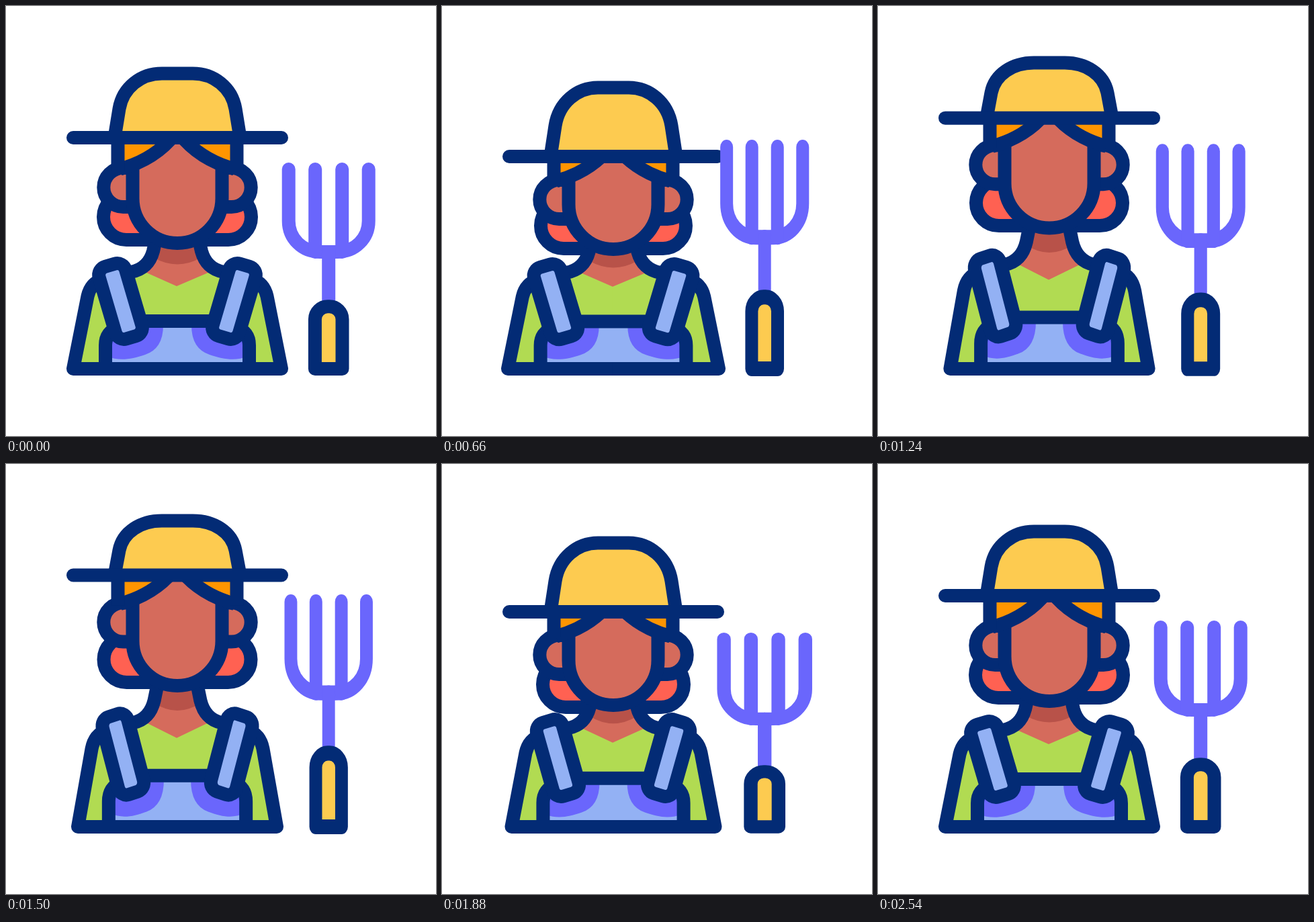
Recreate the animation shown at these times as an HTML page with a canvas. Size 640 by 640 pixels, loop 2880 ms.

```html
<!DOCTYPE html>
<html lang="en">
<head>
<meta charset="utf-8">
<title>Gardener</title>
<style>
html, body { margin: 0; width: 100%; height: 100%; overflow: hidden; background: #fff; }
canvas { display: block; width: 640px; height: 640px; }
</style>
</head>
<body>
<canvas id="stage" width="640" height="640"></canvas>
<script>
const ctx = document.getElementById('stage').getContext('2d');
const LOOP = 2880, STEP = 20, MID = 255, GROUND = 540;
const NAVY = '#032b75', YELLOW = '#fdcb50', ORANGE = '#ff9500', SKIN = '#d56b5c',
  SHADE = '#b85249', RED = '#ff6152', GREEN = '#b1db52', BLUE = '#93b1f4', PURPLE = '#6a66fc';

// Pose keys: pixel offsets from the resting pose at each time in ms.
const times = [200, 460, 660, 980, 1400, 1500, 1720, 1820, 1880, 2160, 2260, 2540];
const tracks = {
  width:  [0, 13, 2, -7, -7.5, -7, 10, 2, -3.5, -3.5, -2, 0],
  body:   [0, 13, 1, -12, -12.5, -12, 10, 2, -3, -3, -2, 0],
  hat:    [0, 30, 21, -7, -18, -16, 20, 26, 17, -1, -5, 0],
  brim:   [0, 36, 28, -15.5, -32.5, -30.5, 22, 33, 24, -14, -18, 0],
  ear:    [0, 28, 18, -21.5, -36.5, -34.5, 18, 22, 14, -18, -20, 0],
  chin:   [0, 18, 9, -16, -24, -23, 12, 12, 6, -7, -9, 0],
  hair:   [0, 20, 13, -9, -24, -23, 12, 21, 14, -17, -16, 0],
  spread: [0, -1, -2, -3, 0, -0.5, -2, -5, -5, 6, 4, 0],
  tine:   [0, 58, -34, 0, -41, -39, 44, 42, 18, -20, -16, 0],
  handle: [0, 26, -15, 8, -20, -18, 16, 18, 11, -14, -8, 0]
};

// Monotone cubic interpolation: extremes ease, nothing overshoots.
function slope(v, i) {
  if (i === 0 || i === v.length - 1) return 0;
  const a = (v[i] - v[i - 1]) / (times[i] - times[i - 1]);
  const b = (v[i + 1] - v[i]) / (times[i + 1] - times[i]);
  return a * b <= 0 ? 0 : 2 * a * b / (a + b);
}

function sample(v, t) {
  const last = times.length - 1;
  if (t <= times[0]) return v[0];
  if (t >= times[last]) return v[last];
  const i = times.findIndex(k => k > t) - 1;
  const h = times[i + 1] - times[i], u = (t - times[i]) / h, w = 1 - u;
  return v[i] * (1 + 2 * u) * w * w + v[i + 1] * (3 - 2 * u) * u * u
    + h * u * w * (slope(v, i) * w - slope(v, i + 1) * u);
}

// Outlines keep their weight under a transform unless the pen is scaled too.
function shape(build, fill, stroke, { cap = 'butt', scalePen = false } = {}) {
  ctx.beginPath();
  build(ctx);
  if (fill) { ctx.fillStyle = fill; ctx.fill(); }
  if (stroke) {
    ctx.save();
    if (!scalePen) ctx.resetTransform();
    ctx.strokeStyle = stroke;
    ctx.lineWidth = 20;
    ctx.lineCap = cap;
    ctx.lineJoin = 'round';
    ctx.stroke();
    ctx.restore();
  }
}

const line = (x1, y1, x2, y2, color, options) =>
  shape(c => { c.moveTo(x1, y1); c.lineTo(x2, y2); }, null, color, options);

function bothSides(draw) {
  draw();
  ctx.save();
  ctx.translate(2 * MID, 0);
  ctx.scale(-1, 1);
  draw();
  ctx.restore();
}

function strap() {
  ctx.save();
  ctx.translate(170.5, 439.5);
  ctx.rotate(-0.286);
  shape(c => c.roundRect(-20.5, -56, 41, 112, 13), BLUE, NAVY);
  ctx.restore();
}

function shirtEdge(c) {
  c.moveTo(MID + 1, GROUND);
  c.lineTo(100, GROUND);
  c.lineTo(121.5, 432);
  c.quadraticCurveTo(126, 412, 145, 406);
}

function drawBody(p) {
  ctx.save();
  ctx.translate(MID, GROUND);
  ctx.scale(1 + p.width / 155, 1 - p.body / 160);
  ctx.translate(-MID, -GROUND);

  bothSides(() => shape(c => {
    shirtEdge(c);
    c.lineTo(192, 390);
    c.lineTo(MID + 1, 390);
  }, GREEN));

  // Neck, with the shadow following the chin.
  shape(c => {
    c.moveTo(229, 320);
    c.lineTo(214, 380);
    c.lineTo(207, 396);
    c.lineTo(254, 417);
    c.lineTo(303, 396);
    c.lineTo(296, 380);
    c.lineTo(281, 320);
  }, SKIN);
  const dy = (p.chin - p.body) / 2;
  shape(c => {
    c.moveTo(229, 320);
    c.lineTo(281, 320);
    c.lineTo(291, 374 + dy);
    c.quadraticCurveTo(MID, 395 + dy, 219, 374 + dy);
  }, SHADE);
  bothSides(() => shape(c => {
    c.moveTo(228, 326);
    c.lineTo(219, 365);
    c.quadraticCurveTo(212, 391, 186, 396);
  }, null, NAVY));

  shape(c => {
    c.moveTo(148, GROUND);
    c.lineTo(148, 505);
    c.quadraticCurveTo(148, 470, 183, 469);
    c.lineTo(327, 469);
    c.quadraticCurveTo(362, 470, 362, 505);
    c.lineTo(362, GROUND);
  }, BLUE);
  bothSides(() => {
    shape(c => {
      c.moveTo(150, 521);
      c.bezierCurveTo(168, 529, 186, 526, 207, 519);
      c.quadraticCurveTo(234, 510, 234, 475);
      c.lineTo(150, 475);
    }, PURPLE);
    shape(c => {
      c.moveTo(148, GROUND);
      c.lineTo(148, 505);
      c.quadraticCurveTo(148, 485, 168, 478);
    }, null, NAVY);
    shape(shirtEdge, null, NAVY);
  });
  line(190, 469, 320, 469, NAVY);
  bothSides(strap);
  ctx.restore();
}

function drawHead(p) {
  const brim = 196 + p.brim, ear = 270 + p.ear, jaw = 286.5 + p.chin;
  const fringe = ear - 29;

  bothSides(() => {
    const x = 179 - p.spread, y = 314 + p.hair;
    shape(c => {
      c.moveTo(212, y - 34);
      c.lineTo(x, y - 34);
      c.arc(x, y, 34, -Math.PI / 2, Math.PI / 2, true);
      c.lineTo(221, y + 34);
    }, RED, NAVY);
    shape(c => {
      c.moveTo(189, fringe);
      c.lineTo(174.3, fringe);
      c.arc(174.3, ear, 29, -Math.PI / 2, Math.PI / 2, true);
      c.lineTo(189, ear + 29);
    }, SKIN, NAVY);
  });

  const face = top => c => {
    c.moveTo(188.5, top);
    c.lineTo(188.5, jaw);
    c.arc(MID, jaw, 66.5, Math.PI, 0, true);
    c.lineTo(321.5, top);
  };
  shape(face(brim), SKIN);
  shape(face(fringe - 4), null, NAVY);

  // The fringe moves with the ears and slides under the brim.
  ctx.save();
  ctx.beginPath();
  ctx.rect(0, brim, 640, 640);
  ctx.clip();
  bothSides(() => {
    const lock = c => {
      c.moveTo(252, fringe - 51);
      c.quadraticCurveTo(222, fringe - 12.5, 170, fringe + 1.5);
    };
    shape(c => { lock(c); c.lineTo(166, fringe - 51); }, ORANGE);
    shape(lock, null, NAVY);
    line(166.5, brim, 166.5, fringe + 4, NAVY);
  });
  ctx.restore();

  const k = (106 + p.brim - p.hat) / 106;
  const y = v => brim - (196 - v) * k;
  const top = brim - 106 * k + 10.5;
  shape(c => {
    c.moveTo(161.5, brim);
    c.lineTo(168.5, y(153));
    c.bezierCurveTo(174, y(121), 201, top, 232, top);
    c.lineTo(278, top);
    c.bezierCurveTo(309, top, 336, y(121), 341.5, y(153));
    c.lineTo(348.5, brim);
  }, YELLOW, NAVY);
  line(100, brim, 410, brim, NAVY, { cap: 'round' });
}

function drawFork(p) {
  const stretch = p.tine - p.handle;
  const sx = 1 + 0.0026 * stretch, sy = 3 - 2 * sx;
  // Resting height to a height inside the scaled space.
  const y = v => (v + p.handle + (437 - v) / 204 * stretch - GROUND) / sy;
  const tip = y(233) + 10, base = y(376) - 10, bend = y(320), grip = y(437) + 10.3;
  const pen = { cap: 'round', scalePen: true };

  ctx.save();
  ctx.translate(480.2, GROUND);
  ctx.scale(sx, sy);
  shape(c => {
    c.moveTo(-59.5, tip);
    c.lineTo(-59.5, bend);
    c.bezierCurveTo(-59.5, y(346), -39, base, -13, base);
    c.lineTo(13, base);
    c.bezierCurveTo(39, base, 59.5, y(346), 59.5, bend);
    c.lineTo(59.5, tip);
  }, null, PURPLE, pen);
  line(-20, tip, -20, base, PURPLE, pen);
  line(20, tip, 20, base, PURPLE, pen);
  line(0, base, 0, grip, PURPLE, pen);
  shape(c => c.roundRect(-20.3, grip, 40.6, -grip, [19, 19, 0, 0]), YELLOW, NAVY, pen);
  ctx.restore();
}

function render(now) {
  const t = Math.floor(now % LOOP / STEP) * STEP;
  const pose = {};
  for (const name in tracks) pose[name] = sample(tracks[name], t);
  ctx.fillStyle = '#fff';
  ctx.fillRect(0, 0, 640, 640);
  drawBody(pose);
  drawHead(pose);
  drawFork(pose);
}

let start;
function tick(now) {
  if (start === undefined) start = now;
  render(now - start);
  requestAnimationFrame(tick);
}
render(0);
requestAnimationFrame(tick);
</script>
</body>
</html>
```
